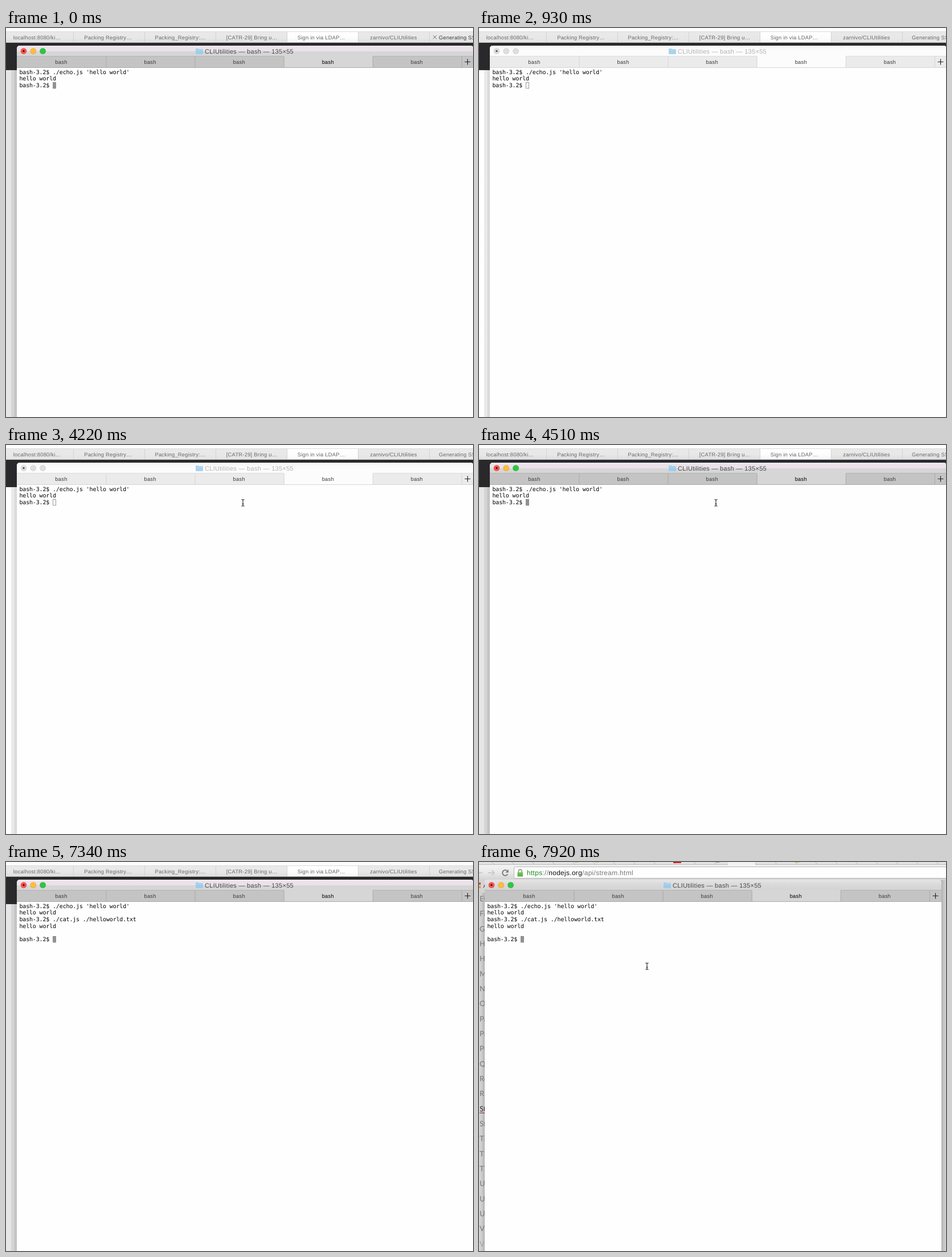
Recreate the animation shown at these times as an HTML page with a canvas. Size 820 by 683 pixels, loop 8 s.

```html
<!DOCTYPE html>
<html lang="en">
<head>
<meta charset="utf-8">
<title>Terminal session</title>
<style>
  html, body { margin: 0; width: 100%; height: 100%; overflow: hidden; background: #fff; }
  canvas { display: block; }
</style>
</head>
<body>
<canvas id="stage" width="820" height="683"></canvas>
<script>
const W = 820, H = 683, LOOP = 8000;
const ctx = document.getElementById('stage').getContext('2d');
const UI = '"Liberation Sans", Arial, sans-serif';
const MONO = '"DejaVu Sans Mono", Menlo, monospace';
const COL = 5.865, ROW = 11.73;

// Moments at which the scene switches, in ms
const HOVER_END = 150, BLUR = 930, ARROW = 4070, BEAM = 4220, FOCUS = 4510;
const COMMAND = 5110, ENTER = 5410, OUTPUT = 5550, BLUR_2 = 7790, BROWSER = 7920;

const beamPath = [
  [BEAM, 416, 101.5], [6750, 512, 406], [6890, 536, 476],
  [7040, 653, 621], [7190, 769, 668]
];
const BEAM_END = 7340;

function rect(x, y, w, h, color) {
  ctx.fillStyle = color;
  ctx.fillRect(x, y, w, h);
}

function disc(x, y, r, color) {
  ctx.fillStyle = color;
  ctx.beginPath();
  ctx.arc(x, y, r, 0, Math.PI * 2);
  ctx.fill();
}

function path(points, color, width = 1) {
  ctx.strokeStyle = color;
  ctx.lineWidth = width;
  ctx.beginPath();
  points.forEach(([x, y]) => ctx.lineTo(x, y));
  ctx.stroke();
}

function ramp(x0, y0, x1, y1, ...colors) {
  const g = ctx.createLinearGradient(x0, y0, x1, y1);
  colors.forEach((c, i) => g.addColorStop(i / (colors.length - 1), c));
  return g;
}

function text(str, x, y, size, color, align = 'left', family = UI, gap = size * 0.025) {
  ctx.font = `${size}px ${family}`;
  ctx.letterSpacing = gap + 'px';
  ctx.textRendering = 'geometricPrecision';
  ctx.textAlign = align;
  ctx.fillStyle = color;
  ctx.fillText(str, x, y);
  return ctx.measureText(str).width;
}

function browserTabs(hover, active) {
  rect(0, 0, W, 6, '#fdfdfd');
  rect(0, 6, W, 20, ramp(0, 6, 0, 26, '#e9e9e9', '#e8e8e8', active ? '#dedede' : '#e4e4e4'));
  rect(494, 6, 125, 20, ramp(0, 6, 0, 26, '#ffffff', '#fdfdfd', active ? '#f4f4f4' : '#f9f9f9'));
  rect(0, 6, W, 1, '#dadada');
  for (let i = 0; i < 6; i++) rect(118 + i * 125, 7, 1, 18, '#d2d2d2');
  rect(0, 25, W, 1, '#bdbdbd');
  const labels = [
    ['localhost:8080/ki…', 54.5], ['Packing Registry…', 179], ['Packing_Registry:…', 306],
    ['[CATR-29] Bring u…', 431.5], ['Sign in via LDAP…', 553.5], ['zarnivo/CLIUtilities', 680.5]
  ];
  labels.forEach(([s, x]) => text(s, x, 19.5, 9.4, '#686868', 'center'));
  text('Generating SSH Keys', 760, 19.5, 9.4, hover ? '#3c3c3c' : '#686868');
  if (hover) {
    path([[749.8, 12.8], [756.2, 19.2]], '#707070');
    path([[756.2, 12.8], [749.8, 19.2]], '#707070');
  }
}

function desktop(active) {
  rect(0, 26, W, 48, '#29292b');
  rect(0, 74, 20, H - 74, active ? '#e6e6e6' : '#fefefe');
  rect(9, 74, 5, H - 74, active ? '#d5d5d5' : '#eaeaea');
  rect(14, 74, 6, H - 74, active ? ramp(14, 0, 20, 0, '#cacaca', '#bdbdbd')
                                 : ramp(14, 0, 20, 0, '#e2e2e2', '#d2d2d2'));
}

function docsPage() {
  rect(0, 0, W, H, '#e6e6e6');
  // bottom edge of the tab strip
  rect(0, 0, W, 5, '#e3e3e3');
  for (let x = 22; x < W; x += 35.5) path([[x, 0], [x + 5, 4.5]], '#b9b9b9');
  rect(0, 4, W, 1, '#bcbcbc');
  rect(437, 0, 48, 6, '#f3f3f3');
  for (const [x, c] of [[171, '#c5d34a'], [207, '#c8cf5a'], [419, '#9a83b5'], [559, '#d8b24a']])
    rect(x - 3, 0, 6, 1, c);
  rect(341, 0, 14, 2, '#cf2020');
  // toolbar
  rect(0, 5, W, 27, ramp(0, 5, 0, 32, '#f3f3f3', '#e9e9e9', '#d2d2d2'));
  ctx.beginPath();
  ctx.roundRect(61.5, 8.5, 800, 20, 2);
  ctx.fillStyle = '#fefefe';
  ctx.fill();
  ctx.strokeStyle = '#b4b4b4';
  ctx.lineWidth = 1;
  ctx.stroke();
  path([[0, 19], [6, 19]], '#cbcbcb', 2);
  path([[16, 19], [27, 19]], '#cbcbcb', 2);
  path([[22.5, 14.5], [27, 19], [22.5, 23.5]], '#cbcbcb', 2);
  ctx.beginPath();
  ctx.arc(46, 19, 4.8, 0.5, 5.4);
  ctx.strokeStyle = '#777';
  ctx.lineWidth = 1.9;
  ctx.stroke();
  ctx.fillStyle = '#777';
  ctx.beginPath();
  ctx.moveTo(51.8, 13);
  ctx.lineTo(51.8, 18.6);
  ctx.lineTo(46.3, 18.6);
  ctx.fill();
  // padlock
  ctx.beginPath();
  ctx.arc(72.3, 16, 2.9, Math.PI, 0);
  ctx.lineTo(75.2, 19);
  ctx.moveTo(69.4, 16);
  ctx.lineTo(69.4, 19);
  ctx.strokeStyle = '#8c9c86';
  ctx.lineWidth = 1.6;
  ctx.stroke();
  rect(67.5, 18, 9.6, 7.5, ramp(0, 18, 0, 25.5, '#7fcb5c', '#55a83a'));
  let x = 84;
  for (const [s, c] of [['https', '#128a1e'], ['://', '#777'], ['nodejs.org', '#111'], ['/api/stream.html', '#777']])
    x += text(s, x, 23.4, 11.96, c);
  // sidebar behind the window
  rect(0, 32, W, 22, '#d4d4d4');
  rect(0, 36, 3, 4, '#d9512c');
  rect(0, 42, 3, 4, '#e0a03c');
  text('Apps', 7.5, 45, 11, '#333');
  rect(0, 54, 12, H - 54, ramp(0, 0, 10, 0, '#d9d9d9', '#cbcbcb', '#b2b2b2'));
  const names = 'Events|File System|Globals|HTTP|HTTPS|Modules|Net|OS|Path|Process|Punycode|' +
    'Query Strings|Readline|REPL|Stream|String Decoder|Timers|TLS/SSL|TTY|UDP|URL|Utilities|V8|VM';
  names.split('|').forEach((s, i) => {
    const y = 69 + i * 26.33;
    text(s, 1, y, 13, i === 14 ? '#3d2222' : i === 23 ? '#a0a0a0' : '#747474', 'left', 'Lato, sans-serif', 0);
    if (i === 14) rect(1, y + 2.5, 12, 1, '#5c3030');
  });
  rect(811, 32, 9, H - 32, ramp(811, 0, 820, 0, '#a9a9a9', '#c4c4c4', '#d3d3d3'));
}

function lights(active) {
  const colors = active ? ['#fc5652', '#fdbd3e', '#2fc544'] : ['#dedede', '#dedede', '#dedede'];
  const edges = active ? ['#e2463f', '#e0a030', '#1fae35'] : ['#cacaca', '#cacaca', '#cacaca'];
  colors.forEach((c, i) => {
    const x = 31 + i * 16.8;
    disc(x, 40.5, 5.3, edges[i]);
    disc(x, 40.5, 4.7, c);
  });
  disc(31, 40.5, 1.7, active ? '#4a0503' : '#555');
}

function frameTop(active, overBrowser) {
  let bar;
  if (!active) bar = ramp(0, 31, 0, 50, '#f8f5f8', '#fcfcfc', '#fcfcfc');
  else if (overBrowser) bar = ramp(0, 31, 0, 50, '#e6e4e5', '#d9d9d9', '#d3d3d3');
  else bar = ramp(0, 31, 0, 50, '#eee5ec', '#e4dee3');
  rect(19, 31, 802, 19, bar);
  if (active && !overBrowser) rect(19, 41, 802, 9, '#d6d6d6');
  lights(active);

  ctx.globalAlpha = active ? 1 : 0.85;
  ctx.fillStyle = '#9dcdeb';
  ctx.beginPath();
  ctx.roundRect(333, 36, 5.5, 4, 1);
  ctx.roundRect(333, 37, 13, 9, 1);
  ctx.fill();
  rect(333, 38.4, 13, 0.8, '#bfe0f4');
  ctx.globalAlpha = 1;
  text('CLIUtilities — bash — 135×55', 349, 44.5, 11.05, active ? '#4a4a4a' : '#b4b0b4');

  const line = active ? '#aaaaaa' : '#d6d6d6';
  rect(19, 50, 802, 19, active ? '#c4c4c4' : '#ebebeb');
  rect(19, 49, 802, 1, active ? '#b4b4b4' : '#dcdcdc');
  rect(488, 49, 156, 20, active ? '#d6d6d6' : '#fcfcfc');
  for (let i = 0; i < 5; i++) {
    rect(175.5 + i * 156.1, 50, 1, 19, line);
    text('bash', 97 + i * 156.1, 62.8, 9.4, active && i === 3 ? '#000' : '#3c3c3c', 'center');
  }
  rect(19, 69, 802, 1, line);
  path([[805.5, 59.5], [815.5, 59.5]], '#222', 1.2);
  path([[810.5, 54.5], [810.5, 64.5]], '#222', 1.2);
}

function shell(t, active) {
  const prompt = 'bash-3.2$ ', command = './cat.js ./helloworld.txt';
  const rows = [prompt + "./echo.js 'hello world'", 'hello world', prompt];
  let col = 10, row = 2;
  if (t >= COMMAND) {
    rows[2] += command;
    col += command.length;
  }
  if (t >= ENTER) [col, row] = [0, 3];
  if (t >= OUTPUT) {
    rows.push('hello world', '', prompt);
    [col, row] = [10, 5];
  }
  const gap = COL - 10 * 0.602;
  rows.forEach((s, i) => text(s, 23.4, 80.7 + i * ROW, 10, '#000', 'left', MONO, gap));
  const x = Math.round(23.4 + col * COL), y = Math.round(71.5 + row * ROW);
  if (active) {
    rect(x, y, 6, 11.5, '#919191');
  } else {
    ctx.strokeStyle = '#9a9a9a';
    ctx.lineWidth = 1;
    ctx.strokeRect(x + 0.5, y + 0.5, 5, 10.5);
  }
}

function terminal(t, active) {
  const overBrowser = t >= BROWSER;
  ctx.save();
  if (overBrowser) ctx.translate(-9, 0);
  ctx.beginPath();
  ctx.roundRect(19, 31, 802, 700, 5);
  ctx.clip();
  rect(19, 31, 802, 700, '#fefefe');
  frameTop(active, overBrowser);
  shell(t, active);
  ctx.restore();
}

function beam(x, y) {
  const strokes = [
    [[x - 2.5, y - 6], [x, y - 5], [x + 2.5, y - 6]],
    [[x, y - 5], [x, y + 5]],
    [[x - 2.5, y + 6], [x, y + 5], [x + 2.5, y + 6]],
    [[x - 1.5, y + 2], [x + 1.5, y + 2]]
  ];
  strokes.forEach(s => path(s, '#222', 1.1));
}

function arrow(x, y) {
  const shape = [[0, 0], [0, 12.6], [2.9, 10], [5, 15], [7.2, 14], [5.1, 9.2], [9, 9.2]];
  ctx.beginPath();
  shape.forEach(([dx, dy]) => ctx.lineTo(x + dx, y + dy));
  ctx.closePath();
  ctx.lineJoin = 'round';
  ctx.lineWidth = 1.8;
  ctx.strokeStyle = '#fff';
  ctx.stroke();
  ctx.fillStyle = '#000';
  ctx.fill();
}

function pointer(t) {
  if (t >= BROWSER) return beam(295, 183);
  if (t >= ARROW && t < BEAM) return arrow(675.3, 30.8);
  if (t < BEAM || t >= BEAM_END) return;
  const [, x, y] = beamPath.filter(p => p[0] <= t).pop();
  beam(x, y);
}

function draw(t) {
  const active = !(t >= BLUR && t < FOCUS) && !(t >= BLUR_2 && t < BROWSER);
  if (t >= BROWSER) {
    docsPage();
  } else {
    browserTabs(t < HOVER_END, active);
    desktop(active);
  }
  terminal(t, active);
  pointer(t);
}

const start = performance.now();
function tick() {
  draw((performance.now() - start) % LOOP);
  requestAnimationFrame(tick);
}
tick();
</script>
</body>
</html>
```
